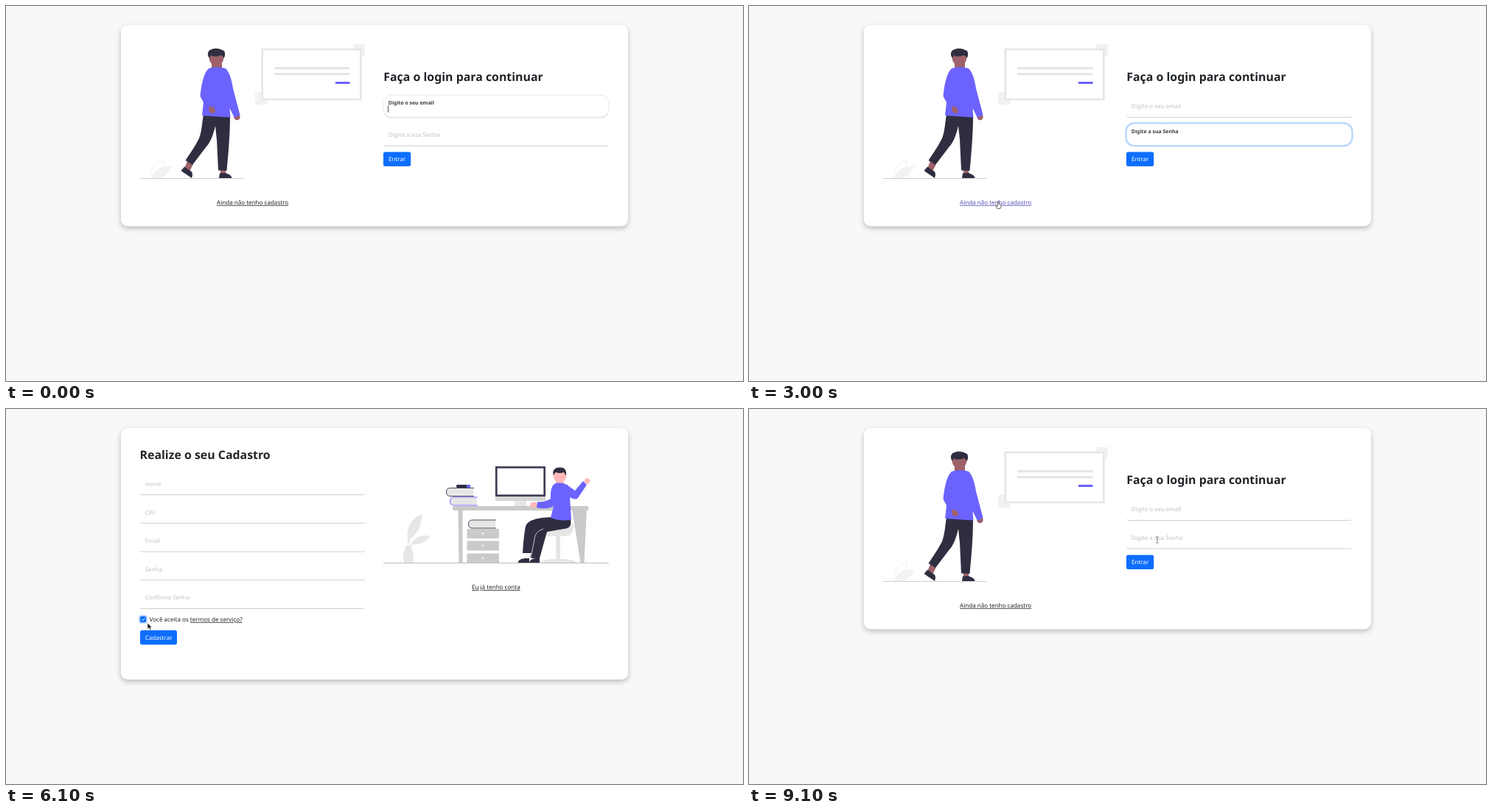
An HTML page for the animation above (9900 ms loop, 1000 px wide and 510 px high).

```html
<!DOCTYPE html>
<html lang="pt-BR">
<head>
<meta charset="utf-8">
<title>Login e cadastro</title>
<style>
  html, body { margin: 0; width: 100%; height: 100%; overflow: hidden; background: #f8f8f7; }
  svg { display: block; width: 1000px; height: 510px; }
  text { font: 8.05px "Noto Sans", "Open Sans", sans-serif; fill: #212529; text-rendering: geometricPrecision; }
  .title { font-size: 15.9px; font-weight: 700; }
  .hint { fill: #c2c2c2; }
  .label { font-size: 6.95px; font-weight: 700; fill: #383b3f; }
  .on-btn { fill: #fff; }
  .link { text-decoration: underline; text-decoration-thickness: .7px; }
  .card { fill: #fff; filter: drop-shadow(0 3.5px 3.5px rgba(0, 0, 0, .24)); }
  .btn { fill: #0d6efd; }
  .rule { fill: none; stroke: #cfcfcf; stroke-width: 1; }
  .dark { fill: #2f2e41; }
  .violet { fill: #6c63ff; }
  .brown { fill: #9f616a; }
  .pink { fill: #ffb8b8; }
  .g1 { fill: #f2f2f2; }
  .g2 { fill: #e6e6e6; }
  .g3 { fill: #cacaca; }
</style>
</head>
<body>
<svg viewBox="0 0 1000 510">
  <g id="login">
    <rect class="card" x="156" y="26" width="688" height="273.5" rx="9"/>

    <!-- board -->
    <path class="g1" d="M471 52h16v16h-16zM338 117h17v17h-17z"/>
    <rect x="347.7" y="59" width="133.6" height="68" fill="#fff" stroke="#e6e6e6" stroke-width="2.6"/>
    <path class="g2" d="M364 83h102.500v3.300h-102.500zM364 91h102.500v3.300h-102.500z"/>
    <path class="violet" d="M447 103h19.500v3h-19.500z"/>

    <!-- leaf and ground -->
    <path class="g1" d="M198 234C200 222 210 217 224 218C221 229 211 236 198 234Z"/>
    <path d="M198 233C196 222 202 213 214 209C215 214 213 218 210 221" fill="none" stroke="#ececec" stroke-width=".8"/>
    <path class="rule" d="M182 234.500H322.500"/>

    <!-- walking man -->
    <path class="brown" d="M246 211L254 215L249 225L242 221ZM291 221H298V230H291Z"/>
    <path class="dark" d="M242 218.500L252 225.500C253.500 228 253 231 252 234L238 224.500C238 222 240 222 242 218.500Z"/>
    <path class="dark" d="M290 227.500L298 227C302 229 306 230 306.500 234H289Z"/>
    <path class="dark" d="M268 148L304 150C304 174 302 197 299.500 224L288 223.500L286 182L284 163C281 176 277 186 272 191L253 216L243.500 210C251 199 257 190 262 180C266 170 266 157 268 148Z"/>
    <circle class="brown" cx="285.500" cy="71.500" r="9.700"/>
    <path class="brown" d="M279 77H293V86H279Z"/>
    <path class="dark" d="M276 71C272 66 274 60 279 59C285 56 292 59 296 61C298 65 297 69 295.500 71C294 68 293 67 291 67C286 69 281 69 278 67C277 68 277 69 276 71Z"/>
    <circle class="brown" cx="313.500" cy="151" r="4.200"/>
    <path class="violet" d="M275 85C282 82.500 292 83 298 85C303 90 306 99 308 112L317.500 148L310 152L303.500 139L304.500 151.500L266 149L268 131L263.500 122C265 108 268 91 275 85Z"/>
    <path class="brown" d="M275 137C279 136 284 139 284 143C283 147 278 147 275.500 143Z"/>
    <path d="M264 123L274 139" fill="none" stroke="#5d55e4" stroke-width=".6"/>

    <text class="link" x="286" y="269.900">Ainda não tenho cadastro</text>
    <text class="title" x="512.300" y="101.700">Faça o login para continuar</text>
    <g id="fields"></g>
    <rect class="btn" x="512" y="198.500" width="37.200" height="19.500" rx="2.500"/>
    <text class="on-btn" x="519" y="211.100">Entrar</text>
  </g>

  <g id="signup">
    <rect class="card" x="156" y="26" width="688" height="342" rx="9"/>
    <text class="title" x="181.500" y="67.600">Realize o seu Cadastro</text>
    <g id="rows"></g>
    <g id="check">
      <rect x="181" y="281" width="10" height="10" rx="2.500" fill="none" stroke="#b9d5fe" stroke-width="2"/>
      <rect class="btn" x="182" y="282" width="8" height="8" rx="1.500"/>
      <path d="M184 286.200L185.500 287.700L188.200 284.600" fill="none" stroke="#fff" stroke-width="1"/>
    </g>
    <rect id="empty" x="182.500" y="282.500" width="7" height="7" rx="1.500" fill="#fff" stroke="#cfcfcf" stroke-width=".8"/>
    <text x="194.500" y="288.900">Você aceita os <tspan class="link">termos de serviço?</tspan></text>
    <rect class="btn" x="182" y="301" width="50" height="19.500" rx="2.500"/>
    <text class="on-btn" x="188.700" y="313.500">Cadastrar</text>

    <!-- plant and ground -->
    <path class="g2" d="M545 180C543 161 549 149 564.500 143C564 157 559 170 549 176C547 180 546 184 546 188L545 187ZM550 182C556 173 565 170 575.500 173C571 180 562 185 552 184L547 189Z"/>
    <path class="g2" d="M542 186H550C550 193 553 196 553 201L552 209H540L539 201C539 196 542 193 542 186Z"/>
    <path class="rule" d="M512 209.500H818" style="stroke:#bdbdbd"/>

    <!-- desk, drawers, books -->
    <path class="g3" d="M613.500 136H619.500V209H614.500ZM768 136H788L784.500 209H779.500Z"/>
    <rect class="g3" x="606" y="132" width="184.500" height="6" rx="2.500"/>
    <g id="drawers"></g>
    <g id="books"></g>
    <path class="dark" d="M612 103H630V107H612L610.500 105Z"/>
    <path class="violet" d="M625 103H630V107H625Z"/>

    <!-- monitor -->
    <path class="g2" d="M691 124H705L707 132H689Z"/>
    <rect x="664" y="78" width="68" height="47" rx="1.500" fill="#d6d6d6"/>
    <rect x="665.300" y="79.300" width="65.400" height="38.400" fill="#fff" stroke="#3f3d56" stroke-width="2.700"/>

    <!-- chair -->
    <path class="g2" d="M728 163C738 160 760 160 770 156C771 166 768 173 758 173H740C733 173 729 170 728 163ZM746 172H752V204C762 204 771 205 774 209H725C728 205 737 204 746 204Z"/>

    <!-- seated man -->
    <path class="dark" d="M695 209C695 205 699 204 704 203H710V209ZM710 209C711 205 714 204 718 203H724V209Z"/>
    <path class="dark" d="M740 147L766 150C768 158 764 163 757 163L734 167L724 203H713L711 201L713 196H701C702 182 703 169 705 160C708 150 722 148 740 147Z"/>
    <path d="M729 163C721 166 718 170 717 177L712 203" fill="none" stroke="#fff" stroke-width=".7"/>
    <circle class="pink" cx="751.500" cy="91" r="8.800"/>
    <path class="pink" d="M746 95H757V104H746Z"/>
    <path class="dark" d="M742.500 90C741 82 746 79 752 79.500C758 79 761 84 760 90C758 89 758 87 757 86C752 88 749 87 746 86C744 87 744 89 742.500 90Z"/>
    <circle class="pink" cx="788.500" cy="98" r="3.700"/>
    <ellipse class="pink" cx="716" cy="130.500" rx="5" ry="4"/>
    <path class="violet" d="M744 102C751 99 760 101 765 106L772 111L783 98L788 103L776 121C773 124 768 122 765 120L767 150C758 153 747 151 739 148L743 132C736 136 728 136 720 134L721 126C728 127 734 125 739 122C739 114 739 106 744 102Z"/>

    <text class="link" x="632" y="245">Eu já tenho conta</text>
  </g>

  <g id="cursor">
    <path id="arrow" d="M0 0V8.300L2 6.600L3.500 9.800L5 9.100L3.500 6H6Z" fill="#111" stroke="#fff" stroke-width=".6"/>
    <path id="beam" d="M-2 -4.200C-.5 -4.200 0 -4 0 -3V3C0 4 -.5 4.200 -2 4.200M2 -4.200C.5 -4.200 0 -4 0 -3M2 4.200C.5 4.200 0 4 0 3" fill="none" stroke="#777" stroke-width=".9"/>
    <path id="hand" d="M-.8 0Q0 -.8 .8 0V3.200L4 4V7L3 9.500H-1.200L-3.600 5.600Q-2.800 4.600 -1.500 6L-.8 6.500Z" fill="#fff" stroke="#444" stroke-width=".8"/>
  </g>
</svg>
<script>
const LOOP = 9900, STEP = 100;
const $ = id => document.getElementById(id);
const show = (el, on) => { el.style.display = on ? "" : "none"; };
const between = (t, a, b) => t >= a && t < b;
const ramp = (t, a, b) => Math.max(0, Math.min(1, (t - a) / (b - a)));

// Underline with slightly raised corners
const rule = (x, y, w) =>
  `<path class="rule" d="M${x} ${y - 1.5}q0 1.500 2 1.500h${w - 4}q2 0 2 -1.500"/>`;

$("rows").innerHTML = ["nome", "CPF", "Email", "Senha", "Confirma Senha"].map((name, i) =>
  `<text class="hint" x="188.700" y="${105 + i * 38.6}">${name}</text>` +
  rule(182, 116.7 + i * 38.7, 304.5)).join("");

$("drawers").innerHTML = [163, 179.5, 196.5].map(y =>
  `<rect class="g3" x="625.500" y="${y}" width="43.500" height="13"/>
   <circle cx="647" cy="${y + 6.3}" r="1.300" fill="#fff"/>`).join("");

const book = (x, y, color) =>
  `<path d="M${x + 37} ${y + 1.5}h-31q-5 0 -5 4.500t5 4.500h31z" fill="#e6e6e6"/>
   <path d="M${x + 38} ${y + .5}h-32q-5.500 0 -5.500 5.500t5.500 5.500h32" fill="none" stroke="${color}" stroke-width="1"/>`;
$("books").innerHTML =
  book(597, 107, "#3f3d56") + book(602, 119.5, "#6c63ff") + book(627, 150.5, "#3f3d56");

function makeField(name, y) {
  const g = document.createElementNS("http://www.w3.org/2000/svg", "g");
  g.innerHTML = `
    <g>${rule(513, y + 30.3, 304)}<text class="hint" x="518.800" y="${y + 17.9}">${name}</text></g>
    <g>
      <rect x="512" y="${y + 1}" width="306" height="30" rx="11" fill="#d0d0d0"/>
      <rect x="512" y="${y}" width="306" height="30" rx="11" fill="#fff" stroke="#e6e6e6" stroke-width=".8"/>
      <rect x="511.500" y="${y - .5}" width="307" height="31" rx="11.500" fill="#fff" stroke="#bcd8fd" stroke-width="2.600"/>
      <text class="label" x="518.800" y="${y + 12.8}">${name}</text>
      <path d="M518.500 ${y + 14}v9.500" stroke="#444" stroke-width=".9"/>
    </g>`;
  $("fields").append(g);
  const [idle, focus] = g.children;
  return (on, ring, caret) => {
    show(idle, !on);
    show(focus, on);
    focus.children[2].style.opacity = ring;
    show(focus.children[4], caret);
  };
}
const email = makeField("Digite o seu email", 121.3);
const password = makeField("Digite a sua Senha", 159.8);

// time, x, y
const path = [
  [1100, 592, 160], [1200, 576, 176], [1400, 559, 189.5], [1600, 535, 218],
  [2000, 425, 282], [2400, 355, 283], [2900, 338, 266], [3000, 338, 266],
  [3200, 388, 280], [3400, 388, 280], [3500, 406, 282], [4000, 406, 282],
  [4400, 250, 289], [4500, 250, 289], [4700, 187, 286], [5600, 187, 286],
  [5900, 192, 291], [6100, 192, 291], [6800, 535, 268], [6900, 535, 268],
  [7500, 665, 241], [8700, 665, 241], [8900, 582, 192], [9000, 582, 192],
  [9100, 554, 178], [LOOP, 554, 178]
];
function locate(t) {
  const i = Math.max(1, path.findIndex(p => p[0] > t));
  const [a, b] = [path[i - 1], path[i]];
  const k = ramp(t, a[0], b[0]);
  return [a[1] + (b[1] - a[1]) * k, a[2] + (b[2] - a[2]) * k];
}
const inside = ([x, y], l, top, r, bottom) => x >= l && x <= r && y >= top && y <= bottom;

const loginLink = $("login").querySelector(".link");
const signupLink = $("signup").querySelector(":scope > .link");
const tint = (el, on) => { el.style.fill = on ? "#5650b8" : ""; };

function draw(t) {
  const signup = between(t, 3100, 8100);
  show($("login"), !signup);
  show($("signup"), signup);

  email(t < 1200, ramp(t, 0, 300), t < 600 || t >= 1100);
  password(between(t, 1200, 3100), ramp(t, 1100, 1400), (t - 1200) % 1000 < 500);

  const checked = t >= 5200;
  show($("check"), checked);
  show($("empty"), !checked);

  const pos = locate(t);
  const onLogin = !signup && inside(pos, 286, 261, 383, 273);
  const onSignup = signup && inside(pos, 632, 236, 698, 248);
  const onInput = signup ? inside(pos, 182, 90, 486, 271) : inside(pos, 512, 121, 818, 191);
  tint(loginLink, onLogin);
  tint(signupLink, onSignup);

  const hand = onLogin || onSignup;
  show($("cursor"), t >= 1100);
  $("cursor").setAttribute("transform", `translate(${pos})`);
  show($("hand"), hand);
  show($("beam"), onInput);
  show($("arrow"), !hand && !onInput);
}

const start = performance.now();
function tick(now) {
  const t = Math.max(0, now - start) % LOOP;
  draw(Math.floor(t / STEP) * STEP);
  requestAnimationFrame(tick);
}
draw(0);
requestAnimationFrame(tick);
</script>
</body>
</html>
```
